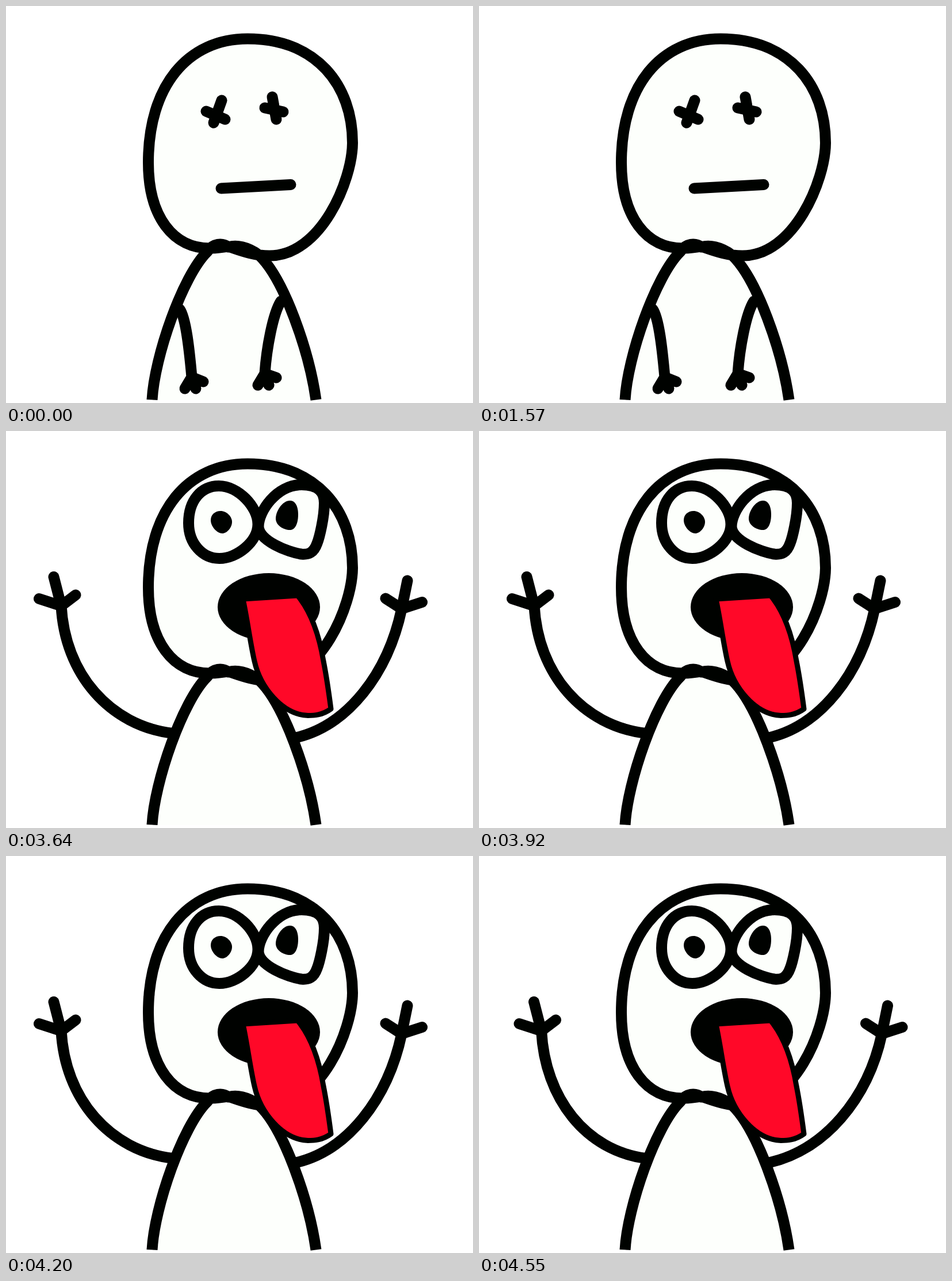
Animation, 812 px wide and 690 px high, one loop 4.62 s. Source, as an HTML page:

```html
<!DOCTYPE html>
<html lang="en">
<head>
<meta charset="utf-8">
<title>Blink and scream</title>
<style>
  html, body { margin: 0; width: 100%; height: 100%; overflow: hidden; background: #fff; }
  svg { display: block; width: 100vw; height: 100vh; }
  .line { fill: none; stroke: #000200; stroke-width: 19; stroke-linecap: round; stroke-linejoin: round; }
  .skin { fill: #fdfffc; }
  .ink { fill: #000200; }
  .tongue { fill: #ff0828; stroke-width: 9; }
  .butt { stroke-linecap: butt; }
</style>
</head>
<body>
<svg viewBox="0 0 812 690">
  <path id="raisedArms" class="line butt"/>
  <path id="raisedHands" class="line"/>

  <!-- Head and body share one path so that both outlines lie above both fills. -->
  <path class="line skin butt" d="M358 421 C290 423 247.5 365 247.5 272 C247.5 140 315 57 420 57
    C540 57 602.5 138 602.5 238 C602 303 548 434 458 434 C430 434 405 424 387 418 C375 420 365 421 358 421Z
    M254 684.5 C258 610 307 469 350 427 C360 412 376 411 387 419
    C400 415 420 418 440 433 C484 475 527 600 539 684.5"/>

  <g id="calm" class="line">
    <path d="M374 317 L495 310.5"/>
    <path d="M302 527 C313 542 319 600 323 645 M311 665 L323 645 L330 665 M323 645 L343 653"/>
    <path d="M478 513 C464 535 453 595 450 639 M438 659 L450 639 L457 659 M450 639 L470 646"/>
    <path id="crossEyes" d="M375 164 L361 203 M348 183 L381 197 M463 158 L470 197 M450 177 L482 184"/>
    <path id="shutEyes" d="M336 184 H387 M457 177.5 H495"/>
  </g>

  <g id="scream">
    <path class="line skin" d="M317.5 160 C317.5 120 340 95.5 370 95.5 C404 95.5 438 132 438 162
      C438 192 402 221.5 371 221.5 C342 221.5 317.5 196 317.5 160Z"/>
    <path class="line skin" d="M439 166 C439 140 470 93.5 514 93.5 C545 93.5 553.5 108 553.5 125
      C553.5 150 545 185 541 195 C535 212 526 215 514 214 C490 211 439 190 439 166Z"/>
    <path class="ink" d="M356 155 C356 145 364 139 373 139 C384 139 393 149 393 158
      C393 168 384 178 376 178 C367 178 356 166 356 155Z"/>
    <path class="ink" d="M469 152 C469 140 480 121 494 121 C504 121 508 133 508 145
      C508 162 502 172 494 172 C482 172 469 164 469 152Z"/>
    <ellipse class="ink" cx="457" cy="306" rx="89" ry="59"/>
    <path class="line tongue" d="M412 292 L507 286 C535 320 547 370 552 400 C558 430 562 460 565 483
      C550 494 535 494.5 525 494.5 C480 493 442 445 432 400 C425 370 420 330 412 292Z"/>
  </g>
</svg>
<script>
  const LOOP = 4620, STEP = 70, SCREAM_START = 3640, SWAY = 12.5;
  const BLINKS = [1500, 2570];
  const el = id => document.getElementById(id);
  const show = (id, on) => el(id).setAttribute('visibility', on ? 'visible' : 'hidden');

  // Shoulders stay fixed while the hands shift sideways.
  function poseArms(dx) {
    el('raisedArms').setAttribute('d',
      `M290 525.5 C${180 + dx / 2} 512 ${102 + dx} 422 ${96 + dx} 303
       M504 533 C${594 + dx / 2} 512 ${664 + dx} 422 ${688 + dx} 309`);
    el('raisedHands').setAttribute('d',
      `M${57.5 + dx} 291.5 L${96 + dx} 304 L${121 + dx} 285 M${96 + dx} 304 L${83 + dx} 253.5
       M${660 + dx} 291 L${688 + dx} 309 L${723.5 + dx} 297.5 M${688 + dx} 309 L${698 + dx} 260`);
  }

  function draw(now) {
    const t = now % LOOP;
    const screaming = t >= SCREAM_START;
    const blinking = BLINKS.some(start => t >= start && t < start + STEP);
    for (const id of ['scream', 'raisedArms', 'raisedHands']) show(id, screaming);
    show('calm', !screaming);
    show('crossEyes', !screaming && !blinking);
    show('shutEyes', blinking);
    if (screaming) poseArms(Math.floor((t - SCREAM_START) / STEP) % 2 * SWAY);
  }

  const start = performance.now();
  function tick() {
    draw(performance.now() - start);
    requestAnimationFrame(tick);
  }
  tick();
</script>
</body>
</html>
```
